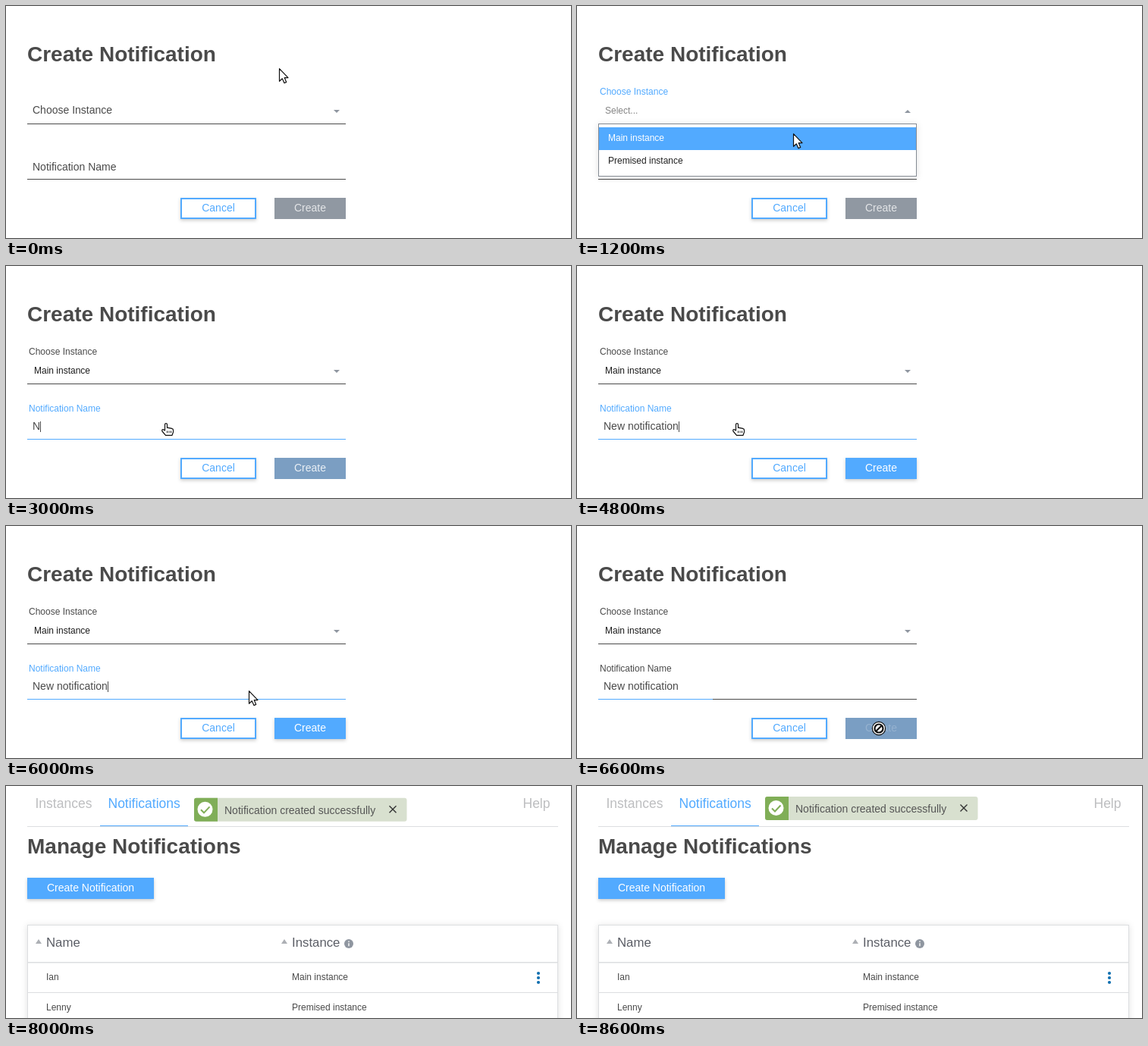
An HTML page that plays this animation: 745 px wide and 306 px high, repeating every 9.5 s.

```html
<!DOCTYPE html>
<html lang="en">
<head>
<meta charset="utf-8">
<title>Create Notification</title>
<style>
html, body { margin: 0; width: 100%; height: 100%; overflow: hidden; background: #fff }
svg { display: block; width: 745px; height: 306px; font: 14px "Liberation Sans", Arial, sans-serif; fill: #4a4a4a }
text { white-space: pre }
.h1 { font-size: 28px; font-weight: bold }
.small { font-size: 12px }
.tab { font-size: 17.5px; fill: #bdbec0 }
.head { font-size: 16.8px; fill: #5b5e66 }
.mid { text-anchor: middle }
.blue { fill: #52aaff }
.white { fill: #fff }
.grey { fill: #8f96a0 }
.line { fill: #dcdee0 }
.lift { filter: drop-shadow(0 2px 2px rgba(0, 0, 0, .2)) }
.glow { filter: drop-shadow(0 1px 4px rgba(0, 0, 0, .12)) }
#cursor > g { fill: #fff; stroke: #111; stroke-width: 1.2; stroke-linejoin: round }
</style>
</head>
<body>
<svg viewBox="0 0 745 306">
  <g id="form">
    <text class="h1" x="28" y="73">Create Notification</text>
    <text id="label1">Choose Instance</text>
    <text id="value1" class="small" x="37" y="142"></text>
    <path id="arrow" class="grey"/>
    <rect x="28" y="155" width="420" height="1"/>
    <text id="label2">Notification Name</text>
    <text id="value2" x="35" y="216"></text>
    <rect id="caret" y="205" width="1" height="14"/>
    <rect x="28" y="228" width="420" height="1"/>
    <rect id="bar" class="blue" x="28" y="228" height="1"/>
    <g class="lift">
      <rect class="blue" x="230" y="253" width="100" height="28"/>
      <rect class="white" x="232" y="255" width="96" height="24"/>
    </g>
    <text class="mid blue" x="280" y="271">Cancel</text>
    <rect id="button" x="354" y="253" width="94" height="28"/>
    <text id="buttonText" class="mid white" x="401" y="271">Create</text>
    <g id="panel">
      <rect class="white glow" x="28.5" y="155.5" width="419" height="69" stroke="#858b94"/>
      <rect class="blue" x="29" y="160" width="418" height="30"/>
      <text class="small white" x="41" y="178">Main instance</text>
      <text class="small" x="41" y="208" style="fill:#222">Premised instance</text>
    </g>
  </g>

  <g id="page">
    <text class="tab" x="38.5" y="29">Instances</text>
    <text class="tab blue" x="134.5" y="29" style="fill:#52aaff">Notifications</text>
    <text class="tab" x="681.5" y="29">Help</text>
    <rect class="line" x="28" y="53" width="700" height="1"/>
    <rect class="blue" x="124" y="52" width="116" height="1"/>
    <text class="h1" x="28" y="89">Manage Notifications</text>
    <rect class="blue lift" x="28" y="121" width="167" height="28"/>
    <text class="mid white" x="111.5" y="139">Create Notification</text>
    <rect class="white glow" x="28.5" y="183.5" width="699" height="140" stroke="#dcdee0"/>
    <rect class="line" x="29" y="232" width="698" height="1.5"/>
    <path fill="#adb0b5" d="M39 208l4-6 4 6zM363 208l4-6 4 6z"/>
    <text class="head" x="53" y="212">Name</text>
    <text class="head" x="377" y="212">Instance</text>
    <circle class="grey" cx="452" cy="208" r="6"/>
    <path class="white" d="M451.3 204.5h1.4v1.4h-1.4zM451.3 207.2h1.4v4h-1.4z"/>
    <g id="rows" class="small">
      <text x="53" y="256">Ian</text>
      <text x="377" y="256">Main instance</text>
      <rect class="line" x="29" y="272" width="698" height="1"/>
      <text x="53" y="296">Lenny</text>
      <text x="377" y="296">Premised instance</text>
      <g fill="#1270b0">
        <circle cx="702" cy="247" r="2.1"/><circle cx="702" cy="253" r="2.1"/><circle cx="702" cy="259" r="2.1"/>
      </g>
    </g>
  </g>

  <g id="toast">
    <rect x="248" y="14" width="280.5" height="31" rx="3" fill="#d8e0cf"/>
    <path fill="#80ae57" d="M279 14V45H251a3 3 0 0 1-3-3V17a3 3 0 0 1 3-3z"/>
    <circle class="white" cx="262.5" cy="29" r="10"/>
    <path fill="none" stroke="#80ae57" stroke-width="2" d="M257 29.5l4 4 7.5-8"/>
    <text x="288" y="35" style="fill:#555">Notification created successfully</text>
    <path stroke="#333" stroke-width="1.4" d="M505.5 24.5l9 9m0-9l-9 9"/>
  </g>

  <g id="cursor">
    <g id="pointer"><path d="M.5 .7V17.3L4.3 13.8 6.9 19.6 9.7 18.4 7.2 12.6H12Z"/></g>
    <g id="hand">
      <path d="M-1.5 9.5V2Q-1.5 .6 0 .6T1.5 2V6.5Q3 5.5 4 6.9 5.3 6.1 6.4 7.3 7.6 6.7 8.4 7.9 9.5 8 9.5 9.5V12L8 16.3H-.5L-5 11Q-6 8.6-3.8 8.5L-1.5 10Z"/>
      <path d="M1.5 10.5v2.6M4 10.5v2.6M6.5 10.5v2.6" stroke-width="1"/>
    </g>
    <g id="blocked">
      <circle cy="5" r="8.6"/>
      <circle cy="5" r="5.5" stroke-width="2.2"/>
      <path d="M-3.8 8.8L3.8 1.2" stroke-width="2.2"/>
    </g>
  </g>
</svg>
<script>
const $ = id => document.getElementById(id);
const LOOP = 9500, STEP = 100;
const NAME = "New notification";

// [time, characters typed]
const keys = [[3000, 1], [3100, 2], [3200, 3], [3300, 5], [3400, 6], [3500, 7], [3700, 8],
  [4200, 9], [4300, 11], [4400, 12], [4600, 13], [4700, 15], [4800, 16]];

// [time, x, y] of the cursor tip
const path = [[0, 360, 82], [400, 321, 130], [700, 321, 130], [1200, 285, 168], [1300, 285, 168],
  [1600, 211, 207], [5200, 211, 207], [5400, 241, 172], [5700, 241, 172], [6300, 398, 262],
  [6700, 398, 262], [7400, 398, 310]];

const within = (t, a, b) => t >= a && t < b;
const ramp = (t, a, b) => Math.min(1, Math.max(0, (t - a) / (b - a)));
const mix = (a, b, p) => a + (b - a) * p;
const smooth = p => p * p * (3 - 2 * p);
const easeOut = p => 1 - (1 - p) ** 3;
const show = (id, on) => $(id).style.display = on ? "" : "none";
const rgb = (a, b, p) => `rgb(${a.map((v, i) => Math.round(mix(v, b[i], p)))})`;

function floatLabel(id, p, low, high, active) {
  const s = $(id);
  s.setAttribute("x", mix(35, 30, p));
  s.setAttribute("y", mix(low, high, p));
  s.style.fontSize = mix(14, 12, p) + "px";
  s.style.fill = active ? "#52aaff" : "#4a4a4a";
}

function moveCursor(t) {
  let i = path.findIndex(k => k[0] > t);
  if (i < 0) i = path.length - 1;
  const [t0, x0, y0] = path[i - 1], [t1, x1, y1] = path[i];
  const p = smooth(ramp(t, t0, t1));
  $("cursor").setAttribute("transform",
    `translate(${Math.round(mix(x0, x1, p))} ${Math.round(mix(y0, y1, p))})`);
  const blocked = t >= 6500;
  const hand = within(t, 1600, 5300) || within(t, 6200, 6500);
  show("blocked", blocked);
  show("hand", hand);
  show("pointer", !blocked && !hand);
}

function drawForm(t) {
  const open = within(t, 700, 1400);
  floatLabel("label1", smooth(ramp(t, 500, 900)), 142, 117, within(t, 600, 1500));
  $("value1").textContent = t < 800 ? "" : t < 1400 ? "Select..." : "Main instance";
  $("value1").style.fill = t < 1400 ? "#858585" : "#1c1c1c";
  $("arrow").setAttribute("d", open ? "M432 141l4-4 4 4z" : "M432 137h8l-4 4z");
  show("panel", open);

  floatLabel("label2", smooth(ramp(t, 1800, 2200)), 217, 192, within(t, 1900, 6500));
  const typed = keys.reduce((n, k) => t >= k[0] ? k[1] : n, 0);
  const value = $("value2");
  value.textContent = NAME.slice(0, typed);
  $("caret").setAttribute("x", 35 + Math.round(value.getComputedTextLength()));
  show("caret", within(t, 1900, 2400) || within(t, 3000, 5300) || within(t, 5800, 6300));

  const sent = ramp(t, 6440, 6690);
  $("bar").setAttribute("width", Math.round(420 * smooth(ramp(t, 1800, 2400)) * (1 - sent)));
  const ready = ramp(t, 2915, 3165) * (1 - sent);
  $("button").style.fill = rgb([144, 152, 162], [82, 170, 255], ready);
  $("button").setAttribute("class", ready > .7 ? "lift" : "");
  $("buttonText").style.opacity = sent ? Math.max(.2, 1 - 1.3 * sent) : mix(.75, 1, ready);
}

// Rises from far below, overshoots and settles.
function drawToast(t) {
  const bounce = [[0, 3000], [.6, -20], [.75, 10], [.9, -5], [1, 0]];
  const p = ramp(t, 7516, 8516);
  const i = Math.max(1, bounce.findIndex(k => k[0] >= p));
  const [p0, y0] = bounce[i - 1], [p1, y1] = bounce[i];
  $("toast").setAttribute("transform", `translate(0 ${mix(y0, y1, easeOut(ramp(p, p0, p1)))})`);
  $("toast").style.opacity = easeOut(ramp(p, 0, .6));
}

function draw(t) {
  const done = t >= 7500;
  show("form", !done);
  show("cursor", !done);
  show("page", done);
  show("rows", t >= 7600);
  show("toast", done);
  if (done) drawToast(t);
  else {
    drawForm(t);
    moveCursor(t);
  }
}

const start = performance.now();
function tick() {
  const t = (performance.now() - start) % LOOP;
  draw(Math.floor(t / STEP) * STEP);
  requestAnimationFrame(tick);
}
tick();
</script>
</body>
</html>
```
